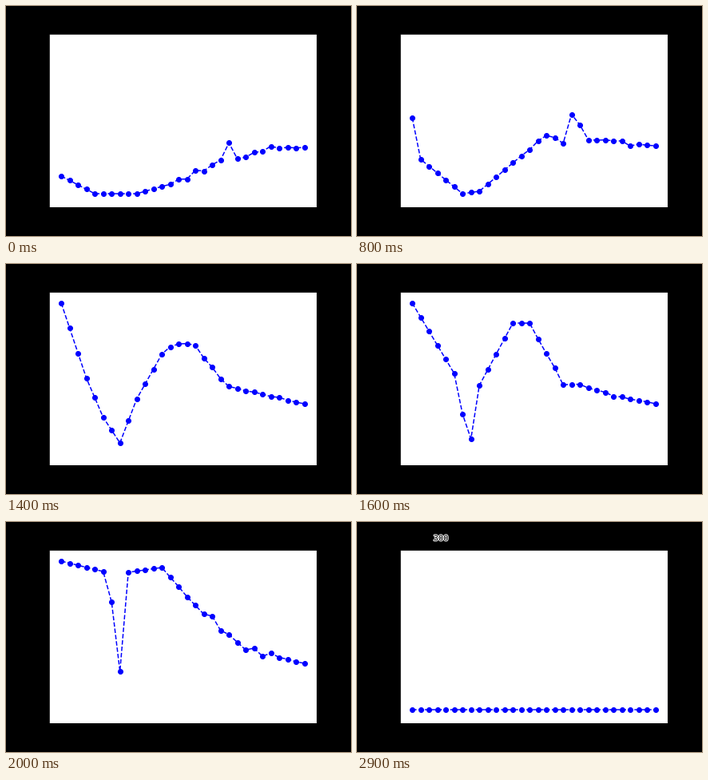
Recreate the animation shown at these times as a matplotlib script. Size 432x288 px, loop 3000 ms.

```python
import numpy as np
import matplotlib.pyplot as plt
from matplotlib.animation import FuncAnimation
from matplotlib.patheffects import withStroke

W, H, DPI = 432, 288, 72
FRAMES, INTERVAL = 30, 100
LEFT, RIGHT, TOP, BOTTOM = 54, 388.8, 34.56, 252
FLOOR, BELOW = 235, 300
COLLAPSE = 24
N = 30

idx = np.arange(N)
xs = np.linspace(69.2, 373.6, N)

# Nine landmarks (point index, height in stage pixels) per key pose,
# four steps apart; they slide from one pose to the next.
KEY_STEP = 4
poses = np.array([
    [(0, 213), (4, 235), (9, 235), (13, 223), (19, 195),
     (20, 173), (21, 193), (24, 179), (29, 177)],
    [(0, 202), (3, 227), (5, 235), (9, 234), (17, 181),
     (21, 155), (22, 171), (26, 172), (29, 183)],
    [(0, 140), (1, 192), (6, 235), (8, 232), (16, 161),
     (18, 168), (19, 134), (21, 166), (29, 175)],
    [(0, 49), (1, 149), (4, 196), (7, 229), (10, 186),
     (13, 133), (17, 121), (22, 163), (29, 175)],
    [(0, 49), (5, 137), (6, 188), (7, 219), (8, 152),
     (12, 74), (14, 75), (18, 149), (29, 175)],
    [(0, 49), (5, 62), (6, 100), (7, 187), (8, 63),
     (12, 57), (16, 106), (22, 158), (29, 177)],
], dtype=float)

# Measurement noise grows over the right half and fades at its end
rng = np.random.default_rng(4)
taper = np.sin(np.pi * np.clip((idx - 12) / (N - 13), 0, 1))
noise = 2.5 * taper * rng.standard_normal((FRAMES, N))
dropped = rng.integers(2, N - 3, FRAMES)


def heights(k):
    if k < COLLAPSE:
        t = min(k / KEY_STEP, len(poses) - 1)
        a = min(int(t), len(poses) - 2)
        marks = poses[a] + (t - a) * (poses[a + 1] - poses[a])
        return np.interp(idx, *marks.T) + noise[k]
    ys = np.full(N, float(FLOOR))
    if k < FRAMES - 1:
        ys[dropped[k]] = BELOW
    return ys


fig = plt.figure(figsize=(W / DPI, H / DPI), dpi=DPI, facecolor="black")
ax = fig.add_axes([LEFT / W, 1 - BOTTOM / H,
                   (RIGHT - LEFT) / W, (BOTTOM - TOP) / H])
ax.set(xlim=(LEFT, RIGHT), ylim=(BOTTOM, TOP), xticks=[], yticks=[])
line, = ax.plot(xs, heights(0), "--o", color="#0000ff", lw=1.5, ms=6)
label = fig.text(95.5 / W, 1 - 23.5 / H, "300", size=10, color="black",
                 family="DejaVu Sans",
                 path_effects=[withStroke(linewidth=1.8, foreground="white")])


def update(k):
    line.set_ydata(heights(k))
    label.set_visible(k == FRAMES - 1)
    return line, label


anim = FuncAnimation(fig, update, frames=FRAMES, interval=INTERVAL,
                     repeat=True, repeat_delay=0)
plt.show()
```
